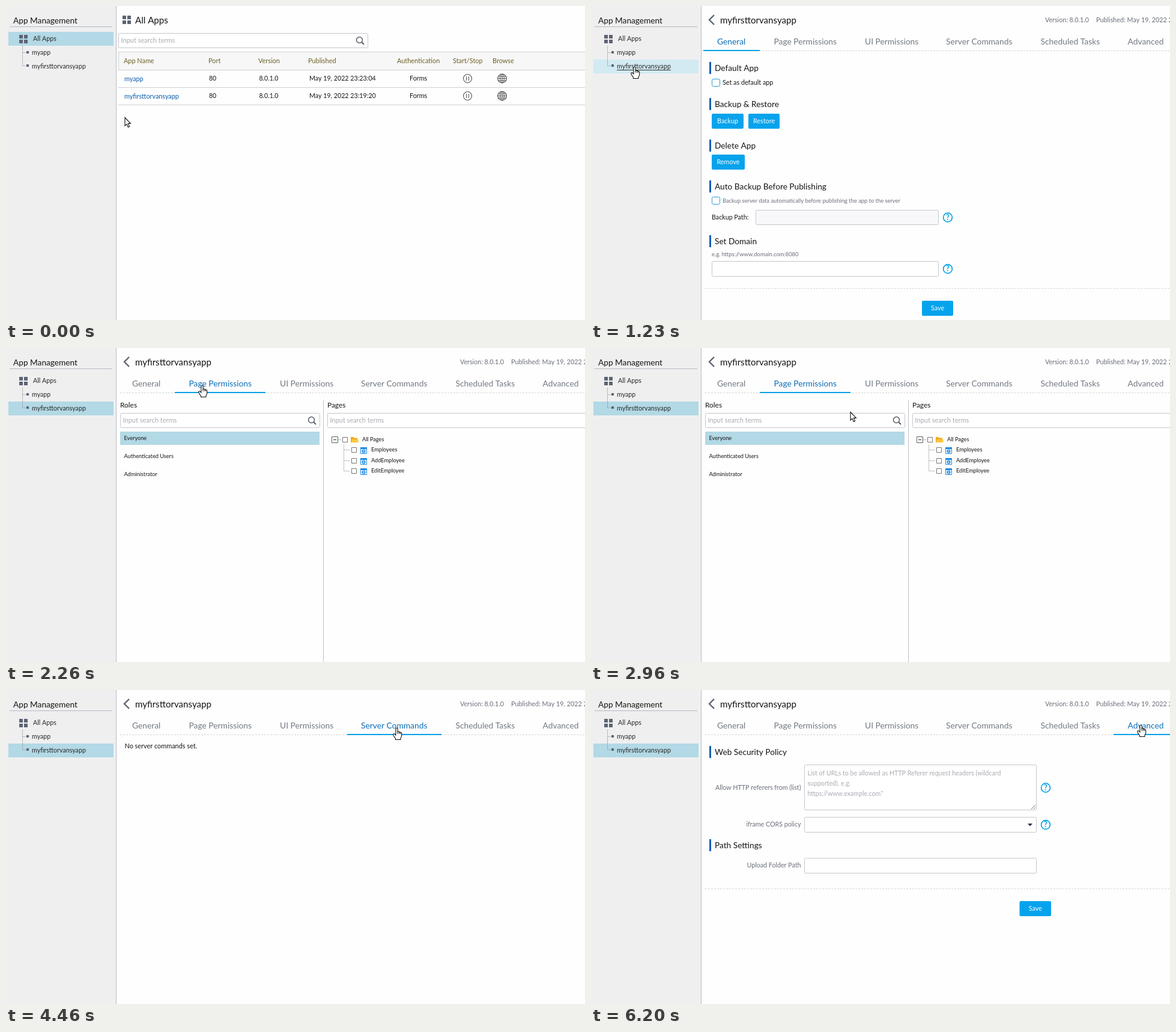
Write an HTML page with a canvas that moves like this. It is 964x522 px and loops after 6.96 s.

```html
<!DOCTYPE html>
<html lang="en">
<head>
<meta charset="utf-8">
<title>App Management</title>
<style>
html, body { margin: 0; width: 100%; height: 100%; overflow: hidden; background: #fefefe; }
canvas { display: block; }
</style>
</head>
<body>
<canvas id="stage" width="964" height="522"></canvas>
<script>
const ctx = document.getElementById('stage').getContext('2d');
const LOOP = 6960;
const INK = '#161616', GREY = '#6a6f7a', HINT = '#a9abb2', LINE = '#c6c7cc', ICON = '#5d6474';
const SELECTED = '#b2d9e5', HOVER = '#d2eaf2', BLUE = '#06a3ec', ACTIVE = '#0d6fb8';

const APPS = [
  { name: 'myapp', published: 'May 19, 2022 23:23:04' },
  { name: 'myfirsttorvansyapp', published: 'May 19, 2022 23:19:20' }
];
const TABS = [
  ['General', 210, 187], ['Page Permissions', 304.5, 281], ['UI Permissions', 456, 432],
  ['Server Commands', 591, 568], ['Scheduled Tasks', 748.5, 725], ['Advanced', 893.5, 870]
];
const tabEnd = i => i < 5 ? TABS[i + 1][2] : 976;

// start, sidebar row, tab, loading delay
const VIEWS = [
  [0, 0, -1, 0], [560, 1, 0, 0], [1230, 2, 0, 0], [2230, 2, 1, 30],
  [3500, 2, 2, 30], [4300, 2, 3, 0], [5100, 2, 4, 0], [6160, 2, 5, 35]
];
// start, end, steps, control x, y, target x, y, ease-out power
const MOVES = [
  [30, 560, 14, 130, 125, 65, 79, 1.5],
  [830, 1230, 10, 68, 90, 72, 100, 1.4],
  [1530, 1860, 11, 190, 139, 326, 61, 1.4],
  [2700, 2945, 8, 372, 230, 432, 106, 1],
  [2980, 3260, 9, 470, 70, 505, 59, 1.4],
  [3760, 4300, 14, 570, 45, 631, 57, 1.4],
  [4460, 4760, 10, 706.5, 81, 782, 57, 1.27],
  [5460, 5860, 12, 848, 57, 915, 57, 2.32]
];

function pointerAt(t) {
  let x = 198, y = 185;
  for (const [t0, t1, n, cx, cy, tx, ty, power] of MOVES) {
    if (t < t0) break;
    const step = Math.min(n, Math.floor((t - t0) / (t1 - t0) * (n - 1) + 1e-6) + 1);
    const u = 1 - (1 - step / n) ** power, v = 1 - u;
    x = v * v * x + 2 * u * v * cx + u * u * tx;
    y = v * v * y + 2 * u * v * cy + u * u * ty;
  }
  return { x, y };
}

function text(s, x, y, size = 10.9, color = INK, align = 'left', weight = 400) {
  ctx.font = `${weight} ${size}px Lato, Carlito, "Open Sans", sans-serif`;
  ctx.fillStyle = color;
  ctx.textAlign = align;
  ctx.fillText(s, x, Math.floor(y));
}
function fill(x, y, w, h, color) {
  ctx.fillStyle = color;
  ctx.fillRect(x, y, w, h);
}
function box(x, y, w, h, stroke = LINE, bg = '#fff', r = 2) {
  ctx.beginPath();
  ctx.roundRect(x + .5, y + .5, w, h, r);
  ctx.fillStyle = bg;
  ctx.fill();
  ctx.strokeStyle = stroke;
  ctx.lineWidth = 1;
  ctx.stroke();
}
function line(points, color, width = 1, dash = []) {
  ctx.beginPath();
  points.forEach(([x, y]) => ctx.lineTo(x, y));
  ctx.setLineDash(dash);
  ctx.strokeStyle = color;
  ctx.lineWidth = width;
  ctx.stroke();
  ctx.setLineDash([]);
}
function ring(x, y, rx, ry, color, width) {
  ctx.beginPath();
  ctx.ellipse(x, y, rx, ry, 0, 0, 7);
  ctx.strokeStyle = color;
  ctx.lineWidth = width;
  ctx.stroke();
}
function tiles(x, y, s = 6, gap = 2) {
  for (const dx of [0, s + gap]) for (const dy of [0, s + gap]) fill(x + dx, y + dy, s, s, ICON);
}
function magnifier(x, y) {
  ring(x, y, 5, 5, '#555b66', 1.5);
  line([[x + 3.5, y + 3.5], [x + 7.5, y + 7.5]], '#555b66', 2);
}
function search(x, y, w) {
  box(x, y, w, 24);
  text('Input search terms', x + 4.5, y + 16, 11, HINT);
  magnifier(x + w - 13.5, y + 11.5);
}
function help(x, y) {
  ring(x, y, 7.4, 7.4, '#06a0e4', 1.7);
  text('?', x, y + 4.5, 13, '#06a0e4', 'center', 700);
}
function button(label, x, y, w) {
  ctx.beginPath();
  ctx.roundRect(x, y, w, 25, 2);
  ctx.fillStyle = BLUE;
  ctx.fill();
  text(label, x + w / 2, y + 16, 10.8, '#fff', 'center');
}
function section(label, y) {
  fill(197, y - 10, 3, 20, '#1060b4');
  text(label, 206, y + 5, 13.7);
}
function checkbox(x, y) {
  box(x, y, 13, 12, '#2b9bd6');
}
function rule(y) {
  line([[190, y], [964, y]], '#d4d5d8', 1, [3, 2]);
}

function sidebar(row, p) {
  fill(0, 0, 183, 522, '#efeff0');
  line([[183.5, 0], [183.5, 522]], '#b9bcc3');
  text('App Management', 12, 29, 13.7);
  line([[6, 34.5], [177, 34.5]], '#b4b8c0');
  const hot = p.x >= 4 && p.x < 179 ? Math.floor((p.y - 43) / 23.2) : -1;
  for (let i = 0; i < 3; i++) {
    const bg = i === hot ? HOVER : i === row ? SELECTED : null;
    if (bg) fill(4, [43, 66, 89][i], 175, 23, bg);
  }
  tiles(22, 48);
  text('All Apps', 45, 58, 10.7, '#2b2b2b');
  line([[27.5, 66], [27.5, 99.5]], '#888', 1, [1, 1]);
  APPS.forEach((app, i) => {
    const y = 77.5 + i * 22;
    line([[28, y], [34, y]], '#888', 1, [1, 1]);
    fill(34, y - 2.5, 4, 4, ICON);
    text(app.name, 43, 81 + i * 23, 10.7, '#2b2b2b');
    if (hot === i + 1) fill(43, 83 + i * 23, ctx.measureText(app.name).width, 1, '#333');
  });
  return hot >= 0 && hot < 3;
}

function globe(x, y) {
  ring(x, y, 7.3, 7.3, '#555', 1.2);
  ring(x, y, 3.4, 7.3, '#555', 1);
  line([[x, y - 7], [x, y + 7]], '#555');
  for (const d of [-3.5, 0, 3.5]) {
    const w = Math.sqrt(53 - d * d);
    line([[x - w, y + d], [x + w, y + d]], '#555');
  }
}

function home() {
  tiles(194, 16);
  text('All Apps', 215, 29, 15.1);
  search(187, 45, 415);
  box(187, 76, 800, 30, '#cfd0d3', '#f7f7f8', 0);
  const heads = ['App Name', 196, 'Port', 337, 'Version', 420, 'Published', 503,
    'Authentication', 651, 'Start/Stop', 744, 'Browse', 810];
  for (let i = 0; i < heads.length; i += 2) text(heads[i], heads[i + 1], 95, 10.9, '#6b6122');
  APPS.forEach((app, i) => {
    const y = 120.5 + i * 29;
    text(app.name, 197, y + 4.5, 10.8, '#0b5cad');
    text('80', 338, y + 4, 10.5);
    text('8.0.1.0', 421.5, y + 4, 10.5);
    text(app.published, 505, y + 4, 10.7);
    text('Forms', 672, y + 4, 10.8);
    ring(768.5, y, 7, 7, '#555', 1.1);
    fill(766, y - 3.5, 1, 7, '#555');
    fill(770, y - 3.5, 1, 7, '#555');
    globe(826, y);
    line([[187, y + 15], [964, y + 15]], '#cfd0d3');
  });
}

function header(app, tab, p) {
  line([[205, 15], [197, 23], [205, 31]], ICON, 2.4);
  text(app.name, 215, 29, 15.1);
  text('Version: 8.0.1.0', 756, 27, 10.7, GREY);
  text('Published: ' + app.published, 841, 27, 10.8, GREY);
  rule(74.5);
  let hot = -1;
  TABS.forEach(([label, x, left], i) => {
    if (p.y > 45 && p.y < 75 && p.x >= left && p.x < tabEnd(i)) hot = i;
    text(label, x, 64, 13.8, i === tab ? ACTIVE : i === hot ? '#1a9de0' : '#727983');
  });
  fill(TABS[tab][2], 73, tabEnd(tab) - TABS[tab][2], 2, '#08a0e6');
  return hot >= 0;
}

function general() {
  section('Default App', 103);
  checkbox(201, 121);
  text('Set as default app', 219, 131, 10.8);
  section('Backup & Restore', 163);
  button('Backup', 201, 179, 53);
  button('Restore', 262, 179, 52);
  section('Delete App', 232);
  button('Remove', 201, 247, 55);
  section('Auto Backup Before Publishing', 300);
  checkbox(201, 317);
  text('Backup server data automatically before publishing the app to the server', 219, 327, 9.32, GREY);
  text('Backup Path:', 201, 355, 10.7);
  box(274, 339, 304, 24, LINE, '#f8f8fa');
  help(594, 351.5);
  section('Set Domain', 391);
  text('e.g. https://www.domain.com:8080', 201, 416, 9.4, GREY);
  box(201, 424, 377, 25);
  help(594, 437);
  rule(469.5);
  button('Save', 551, 490, 52);
}

function permissions() {
  text('Roles', 190, 99, 11.9);
  search(190, 108, 332);
  fill(190, 139, 332, 22, SELECTED);
  ['Everyone', 'Authenticated Users', 'Administrator'].forEach((role, i) =>
    text(role, 196.5, 153 + i * 30, 9.2));
  line([[528.5, 87], [528.5, 522]], '#bfc2c8');
  text('Pages', 535, 99, 11.9);
  search(535, 108, 450);

  box(542, 147, 10, 10, '#666', '#fff', 0);
  fill(545, 152, 5, 1, '#333');
  line([[553, 152.5], [559, 152.5]], '#888', 1, [1, 1]);
  box(560, 148, 8, 8, '#777', '#fff', 0);
  fill(574, 148, 5, 3, '#f2ab1c');
  fill(574, 149.5, 11, 7.5, '#f2ab1c');
  fill(575.5, 152, 11, 5, '#ffc93c');
  text('All Pages', 593, 155, 9.2);
  line([[562.5, 161], [562.5, 205]], '#888', 1, [1, 1]);
  ['Employees', 'AddEmployee', 'EditEmployee'].forEach((page, i) => {
    const y = [169, 187, 204][i];
    line([[563, y + .5], [573, y + .5]], '#888', 1, [1, 1]);
    box(575, y - 4, 8, 8, '#777', '#fff', 0);
    box(590, y - 4, 10, 10, '#1e88e0', '#fff', 0);
    fill(590, y - 4, 11, 3, '#1e88e0');
    ring(595.5, y + 2.5, 2.4, 2.4, '#1e88e0', 1.4);
    line([[593, y + 2.5], [598, y + 2.5]], '#1e88e0');
    text(page, 608, y + 3, 9.2);
  });
}

function advanced() {
  const label = (s, y) => text(s, 349.5, y, 10.7, GREY, 'right');
  section('Web Security Policy', 103);
  label('Allow HTTP referers from (list)', 166);
  box(355, 124, 386, 75);
  ['List of URLs to be allowed as HTTP Referer request headers (wildcard', 'supported). e.g.',
    'https://www.example.com*'].forEach((s, i) => text(s, 360.5, 142 + i * 17.3, 10.6, HINT));
  line([[733, 198], [740, 191]], '#777');
  line([[737, 198], [740, 195]], '#777');
  help(757, 162.5);
  label('iframe CORS policy', 227);
  box(355, 211, 386, 25);
  ctx.beginPath();
  ctx.moveTo(727, 222);
  ctx.lineTo(735, 222);
  ctx.lineTo(731, 226.5);
  ctx.fillStyle = '#2f3550';
  ctx.fill();
  help(757, 224);
  section('Path Settings', 258);
  label('Upload Folder Path', 295);
  box(355, 279, 386, 25);
  rule(330.5);
  button('Save', 713.5, 351, 52.5);
}

const note = s => () => text(s, 197.5, 97);
const PAGES = [general, permissions, note('No UI permissions set.'),
  note('No server commands set.'), note('No schedule tasks set.'), advanced];

const ARROW = new Path2D('M0 0V13.5L3.1 10.8L5.3 16L7.6 15L5.4 9.9H9.4Z');
const HAND = new Path2D('M-1.6 1.8Q0 -.8 1.6 1.8V7.2Q3.2 5.6 4.1 7.6Q5.6 6.4 6.3 8.4' +
  'Q8.2 7.6 8.2 9.8V13.5Q8 16 6.4 17.6V20H-2V18Q-5 14.5 -5.8 11.8Q-5.6 9.4 -3.4 10.8L-1.6 12.5Z');

function pointer(p, hand) {
  ctx.save();
  ctx.translate(Math.round(p.x) + (hand ? .5 : 0), Math.round(p.y) + .5);
  ctx.fillStyle = '#fff';
  ctx.strokeStyle = '#111';
  ctx.lineWidth = 1.1;
  const shape = hand ? HAND : ARROW;
  ctx.fill(shape);
  ctx.stroke(shape);
  if (hand) for (const x of [1.6, 4.1, 6.2]) line([[x, 7.5], [x, 10.5]], '#111', .9);
  ctx.restore();
}

function draw(t) {
  const p = pointerAt(t);
  const [start, row, tab, delay] = VIEWS.findLast(v => t >= v[0]);
  fill(0, 0, 964, 522, '#fefefe');
  let hand = sidebar(row, p);
  if (tab < 0) home();
  else {
    hand = header(APPS[row - 1], tab, p) || hand;
    if (t >= start + delay) PAGES[tab]();
  }
  pointer(p, hand);
}

const begin = performance.now();
function tick() {
  draw((performance.now() - begin) % LOOP);
  requestAnimationFrame(tick);
}
tick();
</script>
</body>
</html>
```
